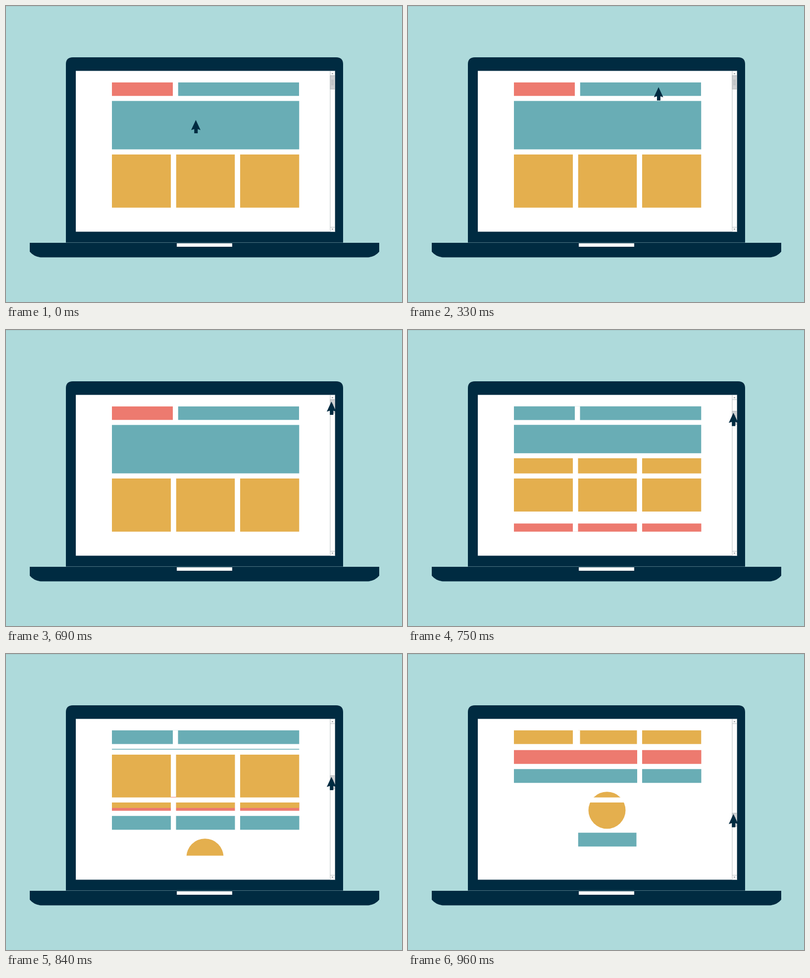
Write an HTML page that moves like this. It is 800x600 px and loops after 1.83 s.

```html
<!DOCTYPE html>
<html lang="en">
<head>
<meta charset="utf-8">
<title>Scrolling laptop</title>
<style>
  html, body { margin: 0; width: 100%; height: 100%; overflow: hidden; background: #aedadb; }
  svg { display: block; width: 800px; height: 600px; }
  .navy { fill: #002b41; }
  .red { fill: #ed7a6f; }
  .teal { fill: #69adb5; }
  .gold { fill: #e4af4e; }
  .white { fill: #fff; }
</style>
</head>
<body>
<svg viewBox="0 0 800 600">
  <defs>
    <clipPath id="view"><rect x="200" y="154.7" width="410" height="254"/></clipPath>
  </defs>
  <rect width="800" height="600" fill="#aedadb"/>
  <rect width="800" height="1" fill="#a0c6c8"/>

  <path class="navy" d="M121 479V118Q121 104 135 104H667Q681 104 681 118V479Z"/>
  <path class="navy" d="M48 480H754V498Q746 508 732 509.500H70Q56 508 48 498Z"/>
  <rect x="121" y="479" width="560" height="1" fill="#4f7684"/>
  <rect class="white" x="345" y="481" width="112" height="7"/>
  <rect class="white" x="141" y="131.500" width="524" height="326"/>

  <g clip-path="url(#view)">
    <g id="lower">
      <path class="red" d="M214 421H463V449H214ZM473 421H592.500V449H473Z"/>
      <path class="teal" d="M214 459.500H463V487.500H214ZM473 459.500H592.500V487.500H473Z"/>
      <circle class="gold" cx="402" cy="543" r="37.500"/>
      <rect class="teal" x="343.500" y="588.500" width="118" height="28"/>
    </g>
    <g id="upper">
      <rect class="red" x="214" y="154.700" width="123" height="27.800"/>
      <rect class="teal" x="347.500" y="154.700" width="244.500" height="27.800"/>
      <rect class="teal" x="214" y="192.300" width="378.300" height="98.500"/>
      <path class="gold" d="M214 301H333V409H214ZM343.500 301H462.500V409H343.500ZM473 301H592.300V409H473Z"/>
    </g>
    <!-- gutters that stay put while the page moves -->
    <path class="white" d="M337 154H347.500V183H337ZM212 182.600H594V192.200H212ZM212 290.800H594V301H212ZM333 301H343.500V409H333ZM462.500 301H473V409H462.500Z"/>
  </g>

  <rect x="654.500" y="132" width="10.500" height="325.500" fill="#fdfdfd"/>
  <path d="M655 132V457.500M664.500 132V457.500M655 141H665M655 448.500H665" fill="none" stroke="#b9c0c3" stroke-width="1"/>
  <path d="M657.500 138L659.500 135.500L661.500 138ZM657.500 451.500L659.500 454L661.500 451.500Z" fill="#8b9195"/>
  <g id="thumb">
    <rect x="655" y="141.500" width="9.500" height="27" fill="#cfd1d3" stroke="#b3b8bb" stroke-width="1"/>
    <path d="M657 150.500H662M657 153.500H662M657 156.500H662M657 159.500H662" stroke="#a5aaad" stroke-width="1"/>
  </g>
  <path id="arrow" class="navy" d="M0 0L9.500 20.500L3.800 18.600V27H-3.200V18.600L-9.500 20.500Z"/>
</svg>
<script>
  const LOOP = 1830, STEP = 30, FIRST = 180, SCROLL = 720;

  // share of the pointer's path covered at each step
  const glide = [0, .029, .1, .215, .365, .525, .665, .78, .865, .93,
                 .955, .972, .983, .991, .996, .998, .999, 1];

  // at each step: thumb travel, travel of the upper blocks
  const scroll = [[8, 14], [23, 41], [47, 62], [76, 80], [105, 97],
                  [129, 131], [150, 165], [168, 200], [181, 226]];
  const RATIO = 1.25;

  const el = id => document.getElementById(id);
  const [lower, upper, thumb, arrow] = ["lower", "upper", "thumb", "arrow"].map(el);
  const move = (node, x, y) => node.setAttribute("transform", `translate(${x} ${y})`);
  const at = (list, i) => list[Math.max(0, Math.min(list.length - 1, i))];

  function curve(u, a, b, c) {
    const v = 1 - u;
    return v * v * a + 2 * u * v * b + u * u * c;
  }

  function draw(time) {
    const t = time % LOOP;
    const u = at(glide, Math.floor((t - FIRST) / STEP));
    const [drag, lift] = t < SCROLL ? [0, 0] : at(scroll, Math.floor((t - SCROLL) / STEP));
    move(arrow, curve(u, 383.5, 478, 657.5), curve(u, 231, 145, 145) + drag * .99);
    move(thumb, 0, drag);
    move(lower, 0, -drag * RATIO);
    move(upper, 0, -lift);
  }

  let start;
  function tick(now) {
    if (start === undefined) start = now;
    draw(Math.max(0, now - start));
    requestAnimationFrame(tick);
  }
  draw(0);
  requestAnimationFrame(tick);
</script>
</body>
</html>
```
